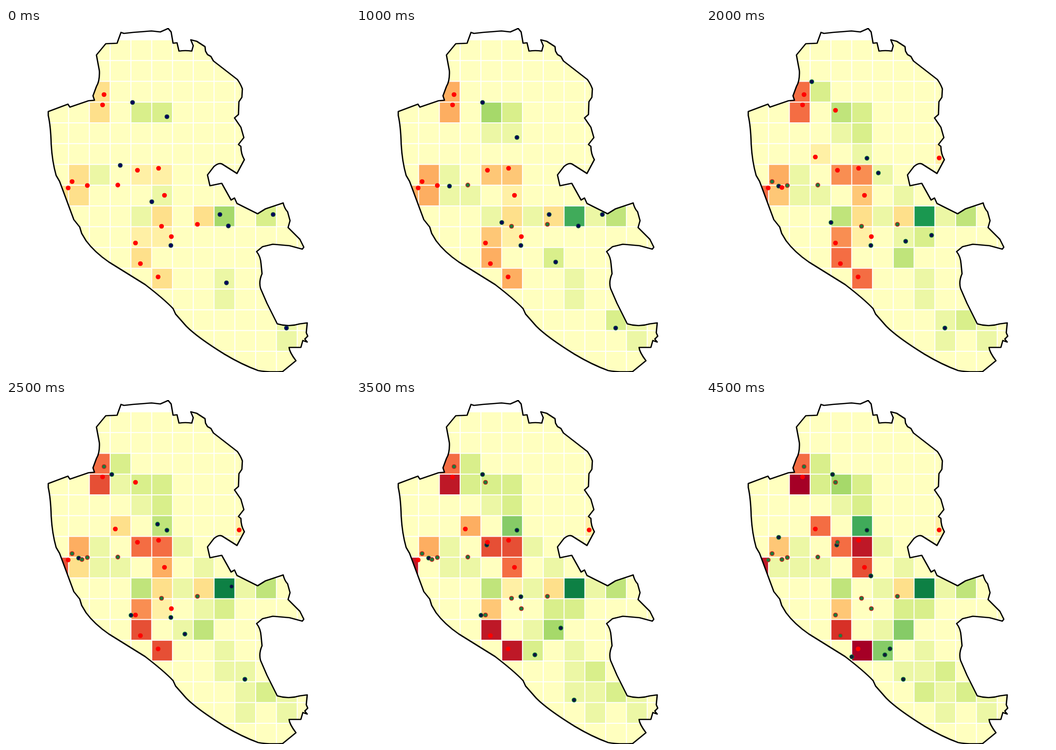
Animation, 700 px wide and 700 px high, one loop 5 s. Source, as an HTML page with a canvas:

```html
<!DOCTYPE html>
<html lang="en">
<head>
<meta charset="utf-8">
<title>Territory grid</title>
<style>
  html, body { margin: 0; width: 100%; height: 100%; overflow: hidden; background: #fff; }
  canvas { display: block; }
</style>
</head>
<body>
<canvas id="map" width="700" height="700"></canvas>
<script>
const ctx = document.getElementById('map').getContext('2d');
const COLS = 13, ROWS = 16, CELL_W = 42.3, CELL_H = 42.26, LEFT = 85, TOP = 24;
const STEPS = 10, STEP_MS = 500, REACH = 23;

const eastCoast = `M234 9L240 11 258 9 296 6 314 8 330 1 336 8 340 31 348 30 352 47Q365 45 378 47L381 36 376 24
  388 27 405 38 406 47 410 54 417 58 422 67 471 105Q478 115 481 124L480 141 474 150 473 176 465 183 478 202
  484 223 473 237 478 241Q478 256 485 268L470 296 440 277Q433 273 423 282L410 299 415 321 439 316
  458 350 465 346 470 357 512 378 528 368 564 356Q567 368 573 374L578 392 574 406 598 430 606 446
  603 450 577 443 543 440 522 445 510 455Q518 465 519 480L521 500Q514 516 518 530L531 560 552 602`;
const westCoast = `Q575 609 598 602L613 600 611 620 614 627 608 633 613 639 604 636 600 650 576 650Q577 660 590 677
  L563 699Q535 701 513 697Q480 685 445 664Q390 630 367 607L345 582 340 571Q322 552 283 522L209 476
  Q180 456 163 433L154 418 150 405 138 390 109 312 102 300Q94 272 92 237Q91 200 86 178L86 170
  126 155 130 161 168 148 180 147 177 138 184 119Q191 108 190 87L184 55 203 32 226 31Z`;
const border = new Path2D(eastCoast + westCoast);

// A site lowers its cell every step until walkers have come near it often enough
const site = (x, y, { contacts = 1, since = -1, until = STEPS } = {}) =>
  ({ x, y, contacts, since, until, met: 0 });
const sites = [
  site(199.5, 135.5),
  site(196.5, 156.5, { contacts: 3 }),
  site(267.5, 289.5, { contacts: 3, since: 0 }),
  site(310.5, 285.5, { contacts: 2, since: 0 }),
  site(134.5, 312.5),
  site(126.5, 325.5, { contacts: 6 }),
  site(165.5, 320.5),
  site(227.5, 319.6, { since: 0 }),
  site(322.5, 340.5, { contacts: 2, since: 0 }),
  site(389.5, 399.5),
  site(316.5, 403.5),
  site(336.5, 424.5, { contacts: 7 }),
  site(263.5, 437.5, { contacts: 2, since: 0 }),
  site(273.5, 479.5),
  site(309.5, 506.5, { contacts: 2 }),
  site(263.5, 167.5, { since: 4 }),
  site(222.5, 262.5, { since: 4 }),
  site(154.5, 324.5, { contacts: 2, since: 4 }),
  site(474.5, 264.5, { since: 4, until: 5 }),
];

// A walker raises the cell it stands in; its route has one compass move per step
const walker = (x, y, route, gone = STEPS) => ({ x, y, route: route.split(' '), gone });
const walkers = [
  walker(257.5, 151.5, '- - - NW - S - E'),
  walker(327.5, 180.5, '- SW E - S'),
  walker(190.2, 279.5, 'E S W W - - - - - N'),
  walker(254.4, 395.8, 'NE SE W W - S - - S SE'),
  walker(435.3, 379.5, '- - W N NW NW S W'),
  walker(452.5, 402.8, '-', 4),
  walker(543.6, 379.5, '- - W SW - N SW S - SW'),
  walker(335.5, 358, 'SS - - - - - - N - N'),
  walker(448.6, 560.8, 'N NW - - N SW S'),
  walker(570.7, 652.8, 'N W - SW N N - SW - NW'),
];
const compass = { N: [0, -1], E: [1, 0], S: [0, 1], W: [-1, 0], '-': [0, 0] };

const near = (a, b) => Math.hypot(a.x - b.x, a.y - b.y) < REACH;

// One unseen step comes first and sets the opening levels
function simulate() {
  const levels = Array(ROWS * COLS).fill(0);
  const add = ({ x, y }, amount) => {
    const i = Math.floor((y - TOP) / CELL_H) * COLS + Math.floor((x - LEFT) / CELL_W);
    levels[i] = Math.max(-10, levels[i] + amount);
  };
  const history = [];
  for (let step = -1; step < STEPS; step++) {
    const active = walkers.filter(w => step < w.gone);
    for (const w of active) {
      for (const way of w.route[step] || '-') {
        w.x += compass[way][0] * CELL_W;
        w.y += compass[way][1] * CELL_H;
      }
      add(w, 1);
    }
    const present = sites.filter(s => step >= s.since);
    for (const s of present) {
      if (active.some(w => near(w, s))) s.met++;
      if (s.met < s.contacts && step < s.until) add(s, -1);
    }
    if (step >= 0) history.push({
      levels: [...levels],
      walkers: active.map(({ x, y }) => ({ x, y })),
      sites: present.map(({ x, y, met, contacts }) => ({ x, y, turned: met >= contacts })),
    });
  }
  return history;
}
const history = simulate();

const ramp = ['a50026', 'd73027', 'f46d43', 'fdae61', 'fee08b', 'ffffbf',
  'd9ef8b', 'a6d96a', '66bd63', '1a9850', '006837']
  .map(hex => [0, 2, 4].map(i => parseInt(hex.slice(i, i + 2), 16)));
const mix = (a, b, t) => `rgb(${a.map((v, i) => Math.round(v + (b[i] - v) * t))})`;

function levelColor(level) {
  const pos = 5 + level / 2, i = Math.min(9, Math.floor(pos));
  return mix(ramp[i], ramp[i + 1], pos - i);
}

function dot({ x, y }, fill, ring) {
  ctx.beginPath();
  ctx.arc(x, y, 4.2, 0, 2 * Math.PI);
  ctx.fillStyle = fill;
  ctx.fill();
  ctx.strokeStyle = ring;
  ctx.lineWidth = 1.3;
  ctx.stroke();
}

function draw(step) {
  const { levels, walkers, sites } = history[step];
  ctx.fillStyle = '#fff';
  ctx.fillRect(0, 0, 700, 700);

  ctx.save();
  ctx.clip(border);
  levels.forEach((level, i) => {
    ctx.fillStyle = levelColor(level);
    ctx.fillRect(LEFT + i % COLS * CELL_W, TOP + Math.floor(i / COLS) * CELL_H, CELL_W, CELL_H);
  });
  ctx.fillStyle = '#fff';
  for (let c = 0; c <= COLS; c++) ctx.fillRect(LEFT + c * CELL_W - 1, 0, 2, 700);
  for (let r = 0; r <= ROWS; r++) ctx.fillRect(0, TOP + r * CELL_H - 1, 700, 2);
  ctx.restore();

  ctx.strokeStyle = '#000';
  ctx.lineWidth = 2.7;
  ctx.lineJoin = 'round';
  ctx.stroke(border);

  const age = step / (STEPS - 1);
  const body = mix([0, 0, 90], [18, 26, 56], age);
  const ring = mix([20, 70, 70], [10, 120, 55], Math.min(1, age * 2));
  for (const w of walkers) dot(w, body, ring);
  for (const s of sites) dot(s, s.turned ? '#1f7a3a' : '#f00', s.turned ? '#d41a1c' : '#f00');
}

let shown = -1;
function tick() {
  const step = Math.floor(performance.now() / STEP_MS) % STEPS;
  if (step !== shown) draw(shown = step);
  requestAnimationFrame(tick);
}
tick();
</script>
</body>
</html>
```
